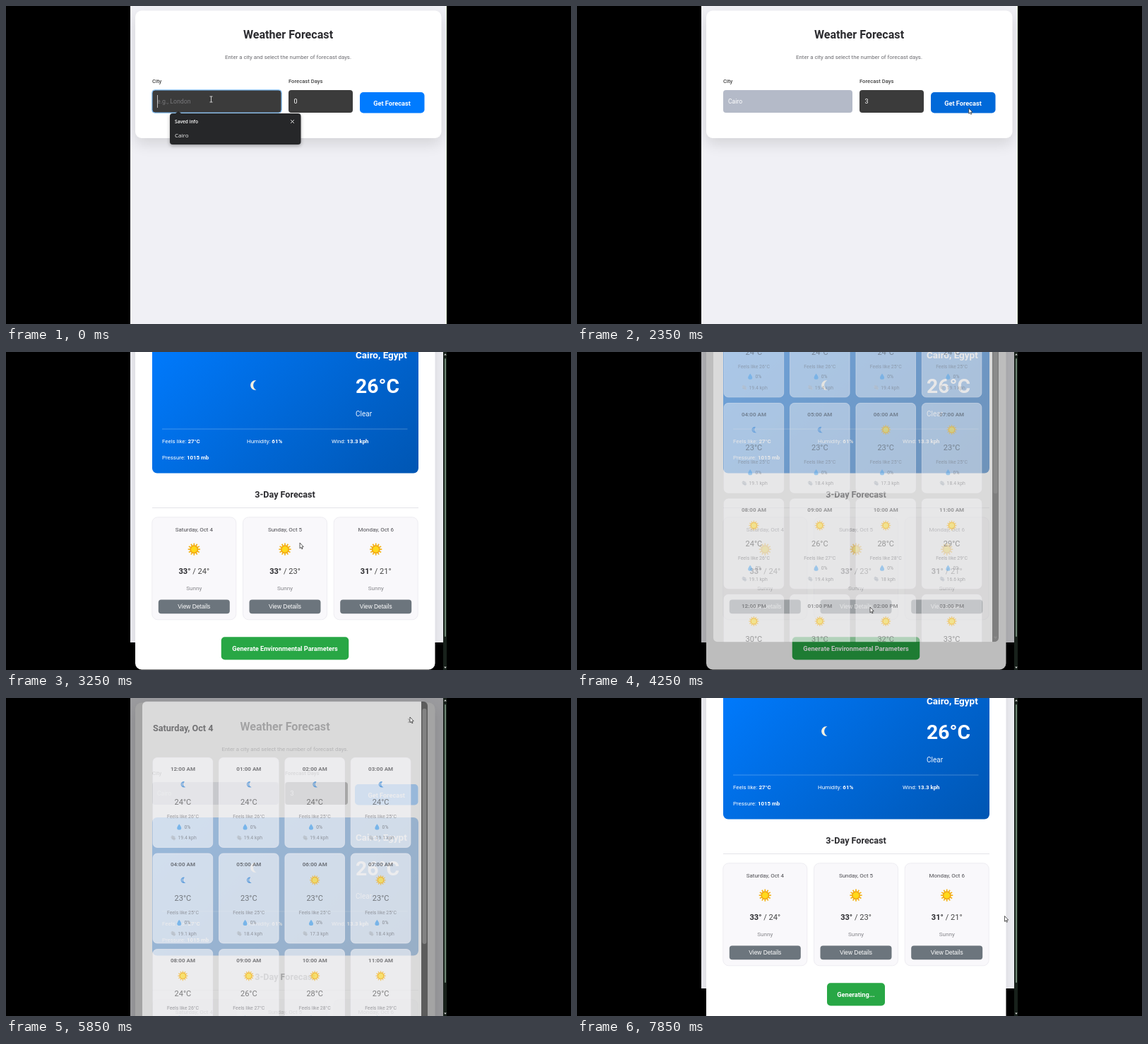
Animation of 800x450 px, one loop 8 s. Source, as an HTML page with a canvas:

```html
<!DOCTYPE html>
<html lang="en">
<head>
<meta charset="utf-8">
<title>Weather Forecast</title>
<style>
html, body { margin: 0; width: 100%; height: 100%; overflow: hidden; background: #000; }
canvas { display: block; width: 800px; height: 450px; }
</style>
</head>
<body>
<canvas id="stage" width="800" height="450"></canvas>
<script>
const c = document.getElementById('stage').getContext('2d');
const LOOP = 8000;
const SANS = 'Roboto, sans-serif';
const BLUE = '#007bff', GREEN = '#28a745', INK = '#2b2b2f';

// Each key: time, then values
const SCROLL = [[0, 0], [2800, 0], [3250, 193], [4700, 193], [5050, 151],
  [5200, 151], [5500, 0], [6050, 0], [6400, 191], [6450, 193]];
const POINTER = [[0, 290, 132], [50, 290, 132], [320, 250, 181], [450, 250, 181],
  [800, 424, 138], [870, 424, 138], [1000, 482, 130], [1750, 482, 130], [2100, 552, 140],
  [2300, 552, 140], [2680, 608, 232], [2800, 608, 232], [3400, 381, 277], [3850, 381, 277],
  [4080, 415, 361], [4300, 415, 361], [4650, 380, 305], [5050, 451, 190], [5200, 451, 190],
  [5680, 572, 27], [5850, 572, 27], [6300, 546, 228], [6400, 546, 228], [6820, 451, 422],
  [7100, 451, 422], [7550, 607, 313], [7780, 607, 313], [7850, 605.5, 308.5]];

const clamp = v => Math.max(0, Math.min(1, v));
const ramp = (t, from, to) => clamp((t - from) / (to - from));

function at(keys, t) {
  let i = 0;
  while (i < keys.length - 1 && keys[i + 1][0] <= t) i++;
  const a = keys[i], b = keys[i + 1] || a;
  const p = ramp(t, a[0], b === a ? a[0] + 1 : b[0]);
  const e = p * p * (3 - 2 * p);
  return a.slice(1).map((v, k) => v + (b[k + 1] - v) * e);
}

function box(x, y, w, h, r, fill, stroke) {
  c.beginPath();
  c.roundRect(x, y, w, h, r);
  if (fill) { c.fillStyle = fill; c.fill(); }
  if (stroke) { c.strokeStyle = stroke; c.lineWidth = 1; c.stroke(); }
}

function shadowBox(x, y, w, h, r, fill, color, blur, dy) {
  c.save();
  c.shadowColor = color; c.shadowBlur = blur; c.shadowOffsetY = dy;
  box(x, y, w, h, r, fill);
  c.restore();
}

// y is the middle of the capital letters
function text(s, x, y, size, color = INK, weight = 400, align = 'left', family = SANS) {
  c.font = `${weight} ${size}px ${family}`;
  c.textAlign = align;
  c.fillStyle = color;
  c.fillText(s, x, y + size * 0.356);
  return c.measureText(s).width;
}
const mid = (s, x, y, size, color, weight, family) => text(s, x, y, size, color, weight, 'center', family);

function poly(points, fill, stroke) {
  c.beginPath();
  points.forEach(([x, y]) => c.lineTo(x, y));
  c.closePath();
  if (fill) { c.fillStyle = fill; c.fill(); }
  if (stroke) { c.strokeStyle = stroke; c.lineWidth = 0.8; c.stroke(); }
}

function triangle(x, y, r, dir, color) {
  poly([[x - r, y - dir * r * 0.6], [x + r, y - dir * r * 0.6], [x, y + dir * r * 0.7]], color);
}

function rule(x, y, w, color) {
  c.fillStyle = color;
  c.fillRect(x, y, w, 1);
}

function sun(x, y, r) {
  c.lineWidth = r * 0.2;
  c.strokeStyle = '#f5b316';
  for (let k = 0; k < 12; k++) {
    const a = k * Math.PI / 6;
    c.beginPath();
    c.moveTo(x + Math.cos(a) * r * 0.6, y + Math.sin(a) * r * 0.6);
    c.lineTo(x + Math.cos(a) * r, y + Math.sin(a) * r);
    c.stroke();
  }
  c.beginPath();
  c.arc(x, y, r * 0.6, 0, 7);
  c.fillStyle = '#ffd91a'; c.fill();
  c.strokeStyle = '#f2a916'; c.stroke();
}

function crescent(x, y, r, fill, stroke) {
  c.beginPath();
  c.moveTo(x + r * 0.55, y - r);
  c.bezierCurveTo(x - r, y - r * 1.05, x - r, y + r * 1.05, x + r * 0.55, y + r);
  c.bezierCurveTo(x - r * 0.25, y + r * 0.5, x - r * 0.25, y - r * 0.5, x + r * 0.55, y - r);
  if (fill) { c.fillStyle = fill; c.fill(); }
  if (stroke) { c.strokeStyle = stroke; c.lineWidth = 1.2; c.stroke(); }
}

function drop(x, y) {
  c.beginPath();
  c.moveTo(x, y - 4.3);
  c.bezierCurveTo(x + 5, y + 2, x + 3, y + 4, x, y + 4);
  c.bezierCurveTo(x - 3, y + 4, x - 5, y + 2, x, y - 4.3);
  c.fillStyle = '#3d9be9';
  c.fill();
}

function wind(x, y) {
  poly([[x - 4, y - 1], [x - 1, y - 4], [x + 4, y + 1], [x + 1, y + 4]], '#c3c8cf');
  c.strokeStyle = '#9aa2ad';
  c.lineWidth = 0.8;
  for (const d of [-1.5, 0.5, 2]) {
    c.beginPath();
    c.moveTo(x - 2.5, y + d - 1);
    c.lineTo(x + 2.5, y + d);
    c.stroke();
  }
}

function field(x, w, fill, focused) {
  if (focused) box(x - 1, 118, w + 2, 34, 5, '#b9dcfb');
  box(x, 119, w, 32, 4, fill, focused ? '#7fb9ee' : null);
}

function drawForm(t, wide) {
  const m = wide ? 399.5 : 395;
  const daysX = wide ? 400 : 395;
  const picked = t >= 420;
  const onDays = t >= 1050 && t < 2150;
  const caret = Math.floor(t / 500) % 2 === 0 || t >= 1400;

  mid('Weather Forecast', m, 40.5, 16.1, INK, 700);
  mid('Enter a city and select the number of forecast days.', m, 72, 7.86, '#6b6b70');
  text('City', 207, 106, 7.7, '#444', 500);
  text('Forecast Days', daysX, 106, 7.65, '#444', 500);

  field(207, wide ? 183 : 179, picked ? '#b4bac8' : '#3b3b3b', t < 1050);
  if (picked) text('Cairo', 214, 135, 8.6, '#fff');
  else text('e.g., London', 214, 135, 8.8, '#77777a');
  if (!picked) { c.fillStyle = '#ddd'; c.fillRect(214, 126, 0.8, 18); }

  field(daysX, wide ? 91 : 89, '#3b3b3b', onDays);
  const days = t < 1100 ? 0 : t < 1350 ? 1 : t < 1600 ? 2 : 3;
  text(String(days), daysX + 7.5, 135, 9, '#fff');
  if (onDays && caret) { c.fillStyle = '#ddd'; c.fillRect(412.5, 126, 0.8, 18); }
  if (t >= 1000 && t < 1850) {
    box(475, 125, 9, 19, 1, '#555');
    triangle(479.5, 130, 2.2, -1, '#eee');
    triangle(479.5, 139, 2.2, 1, '#aaa');
  }

  const over = t >= 1980 && t < 2450;
  if (wide) box(501, 122, 91.5, 29.5, 5, over ? '#0069d9' : BLUE);
  else box(494, 122, 89.5, 29.5, 5, BLUE);
  mid('Get Forecast', wide ? 546.5 : 538.7, 138, 9.2, '#fff', 700);
}

function drawNow() {
  const g = c.createLinearGradient(252, 124, 538, 410);
  g.addColorStop(0, BLUE);
  g.addColorStop(1, '#0056b3');
  box(207, 169, 377, 195.5, 7, g);
  crescent(350.5, 240, 7, '#f3f0e2');
  text('Cairo, Egypt', 495, 197.5, 13.5, '#fff', 700);
  text('26°C', 495, 241, 28.3, '#fff', 700);
  text('Clear', 495, 280.5, 10, '#eef5ff');
  rule(221, 301.5, 347.5, 'rgba(255,255,255,.25)');
  const facts = [['Feels like: ', '27°C', 221, 319.5], ['Humidity: ', '61%', 341, 319.5],
    ['Wind: ', '13.3 kph', 461, 319.5], ['Pressure: ', '1015 mb', 221, 342.5]];
  for (const [name, value, x, y] of facts) {
    const w = text(name, x, y, 7.9, '#fff');
    text(value, x + w, y, 7.9, '#fff', 700);
  }
}

function drawDays() {
  mid('3-Day Forecast', 395, 395, 12.6, INK, 700);
  rule(207, 413, 377, '#e3e3e8');
  const days = [['Saturday, Oct 4', 33, 24], ['Sunday, Oct 5', 33, 23], ['Monday, Oct 6', 31, 21]];
  days.forEach(([date, hi, lo], i) => {
    const x = 266.3 + i * 128.7;
    box(x - 59.5, 426.8, 119, 145, 8, '#f9f8fb', '#eeedf2');
    mid(date, x, 444, 8, '#4a4a4f');
    sun(x, 472.2, 8.6);
    const top = `${hi}°`, low = ` / ${lo}°`, size = 11.1;
    c.font = `700 ${size}px ${SANS}`;
    const w = c.measureText(top).width;
    c.font = `400 ${size}px ${SANS}`;
    const left = x - (w + c.measureText(low).width) / 2;
    text(top, left, 503.2, size, INK, 700);
    text(low, left + w, 503.2, size, '#444');
    mid('Sunny', x, 527.5, 8.1, '#85858a');
    box(x - 50.5, 543.5, 101, 19.7, 4, '#6c757d');
    mid('View Details', x, 553, 8.4, '#fff', 400, 'Liberation Sans, sans-serif');
  });
}

function drawGenerate(busy) {
  const w = busy ? 82 : 180.5;
  box(395 - w / 2, 596.3, w, 32.2, 5, GREEN);
  mid(busy ? 'Generating...' : 'Generate Environmental Parameters', 395, 613, 9.2, '#fff', 700);
}

const HOURS = {
  temp: [24, 24, 24, 24, 23, 23, 23, 23, 24, 26, 28, 29, 30, 31, 32, 33],
  feels: [26, 26, 25, 25, 25, 25, 25, 25, 26, 27, 28, 29, 30, 32, 33, 35],
  wind: [19.4, 19.4, 19.4, 19.1, 19.1, 18.4, 17.3, 18.4, 19.1, 19.4, 18, 16.6, 16.6, 16.2, 15.8, 15.5]
};

function drawHour(i, y) {
  const x = 250.4 + (i % 4) * 93.4;
  const hour = String(i % 12 || 12).padStart(2, '0');
  box(x - 42.3, y, 84.6, 127, 6, '#f9f8fb', '#eeedf2');
  mid(`${hour}:00 ${i < 12 ? 'AM' : 'PM'}`, x, y + 15.5, 8, INK, 700);
  if (i < 6) crescent(x, y + 37.7, 3.6, null, '#1976d2');
  else sun(x, y + 37.7, 7);
  mid(`${HOURS.temp[i]}°C`, x, y + 63, 11, '#333');
  mid(`Feels like ${HOURS.feels[i]}°C`, x, y + 83.5, 6.9, '#66666b');
  drop(x - 5.2, y + 98);
  text('0%', x + 2, y + 98, 6.8, '#55555a');
  wind(x - 13.5, y + 113.5);
  text(`${HOURS.wind[i]} kph`, x - 7, y + 113.5, 6.9, '#66666b');
}

function drawModal(bottom) {
  const top = bottom - 553;
  c.save();
  c.beginPath();
  c.roundRect(193, top, 404, 553, 6);
  c.clip();
  c.fillStyle = '#fff';
  c.fillRect(193, top, 395, 553);
  text('Saturday, Oct 4', 208, top + 38, 12.6, INK, 700);
  mid('×', 572, top + 27, 14, '#888');
  for (let i = 0; i < 16; i++) drawHour(i, bottom - 473.5 + Math.floor(i / 4) * 135.5);
  c.fillStyle = '#2c2c2c';
  c.fillRect(588, top, 9, 553);
  box(589.5, top + 10, 6, 333, 3, '#9c9c9c');
  triangle(592.5, bottom - 6, 2.8, 1, '#9c9c9c');
  c.restore();
}

function drawDropdown(hover) {
  poly([[240, 152], [244, 149], [248, 152]], '#262729');
  shadowBox(232, 152, 185.5, 44, 4, '#262729', 'rgba(0,0,0,.3)', 5, 2);
  if (hover) box(234, 174, 181, 19, 3, '#3b3c3f');
  text('Saved info', 239, 163.5, 6.6, '#fff', 600, 'left', 'Open Sans, sans-serif');
  text('Cairo', 239, 183.5, 8, '#f2f2f2', 400, 'left', 'Open Sans, sans-serif');
  c.strokeStyle = '#fff';
  c.lineWidth = 0.9;
  c.beginPath();
  c.moveTo(403.2, 161.2); c.lineTo(407.8, 165.8);
  c.moveTo(407.8, 161.2); c.lineTo(403.2, 165.8);
  c.stroke();
}

function drawPointer(t) {
  const [x, y] = at(POINTER, t);
  const beam = t < 150 || (t > 600 && t < 930);
  if (beam) {
    c.strokeStyle = '#ddd';
    c.lineWidth = 0.9;
    c.beginPath();
    c.moveTo(x - 1.5, y - 4); c.lineTo(x + 2.5, y - 4);
    c.moveTo(x + 0.5, y - 4); c.lineTo(x + 0.5, y + 4);
    c.moveTo(x - 1.5, y + 4); c.lineTo(x + 2.5, y + 4);
    c.stroke();
    return;
  }
  const shape = [[0, 0], [0, 7.8], [1.7, 6.3], [2.9, 8.8], [4, 8.3], [2.9, 5.8], [5.2, 5.6]];
  poly(shape.map(([dx, dy]) => [x + dx, y + dy]), '#fff', '#333');
}

function drawBars(wide) {
  if (wide) {
    c.fillStyle = '#dfead6';
    c.fillRect(623, 0, 1, 450);
    return;
  }
  c.fillStyle = '#18211b';
  c.fillRect(619, 0, 5, 450);
  box(621, 9, 2, 394, 1, '#6d8573');
  triangle(622, 3.5, 1.8, -1, '#ddd');
  triangle(622, 446.5, 1.8, 1, '#ddd');
}

function draw(t) {
  const wide = t < 2450;
  const busy = t >= 6900;
  const scroll = at(SCROLL, t)[0];
  const open = ramp(t, 4106, 4441) * (1 - ramp(t, 5750, 6000));

  c.fillStyle = '#000';
  c.fillRect(0, 0, 800, 450);
  c.save();
  c.beginPath();
  c.rect(176, 0, 448, 450);
  c.clip();

  c.save();
  c.translate(0, -scroll);
  c.fillStyle = '#f0f0f5';
  c.fillRect(176, 0, 448, 604);
  const height = wide ? 180.5 : busy ? 690 : 636;
  shadowBox(183, 6.5, wide ? 433.5 : 424.5, height, 9, '#fff', 'rgba(0,0,0,.12)', 20, 8);
  drawForm(t, wide);
  if (!wide) {
    drawNow();
    drawDays();
    drawGenerate(busy);
  }
  c.restore();

  if (open > 0) {
    c.globalAlpha = open;
    c.fillStyle = 'rgba(0,0,0,.6)';
    c.fillRect(176, 0, 443, 450);
    drawModal(558 - scroll + 80 * (1 - ramp(t, 4106, 4441)));
    c.globalAlpha = 1;
  }
  if (t < 420) drawDropdown(t >= 250);
  drawBars(wide);
  drawPointer(t);
  c.restore();
}

const start = performance.now();
function tick() {
  draw((performance.now() - start) % LOOP);
  requestAnimationFrame(tick);
}
tick();
</script>
</body>
</html>
```
